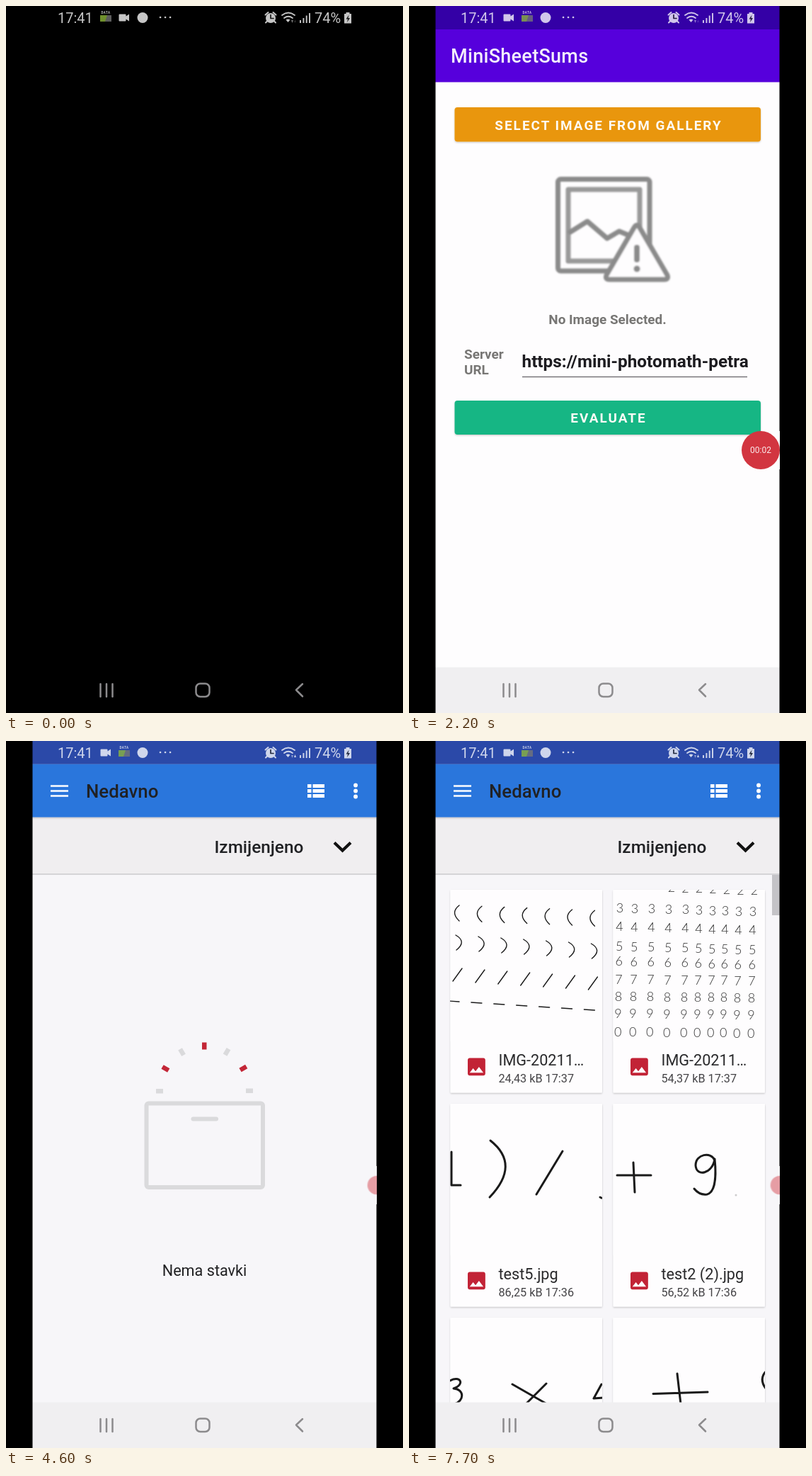
An HTML page that plays this animation: 561x998 px, repeating every 8000 ms.

```html
<!DOCTYPE html>
<html lang="hr">
<head>
<meta charset="utf-8">
<title>Screen recording</title>
<style>
html, body { margin: 0; width: 100%; height: 100%; overflow: hidden; background: #000; }
svg { display: block; width: 100vw; height: 100vh; font-family: Roboto, sans-serif; }
.bold { font-weight: 700; }
.medium { font-weight: 500; }
.mid { text-anchor: middle; }
.line { fill: none; stroke-linecap: round; stroke-linejoin: round; }

.anim { animation: 8s step-end -20ms infinite; }
#app { animation-name: launch; transform-origin: 280.5px 499px; }
#dim { animation-name: dim; }
#picker { animation-name: open; }
#bars { animation-name: bars; }
#empty { animation-name: empty; }
#cards { animation-name: cards; }
#scrollbar, .thumb { opacity: 0; animation-name: thumbs; }
#bubble { animation-name: bubble; transform-origin: 497px 627px; }
#time0 { animation-name: time0; }
#time1 { animation-name: time1; }
#time2 { animation-name: time2; }
#time3 { animation-name: time3; }
#data { animation-name: data; }
#camera { animation-name: camera; }
#upload { animation-name: upload; }

@keyframes launch {
  0% { opacity: 0; }
  1.25% { opacity: .5; transform: translate(-60px, 27px) scale(.62); }
  2.5% { opacity: .95; transform: translate(-18px, 8px) scale(.892); }
  3.75% { opacity: 1; transform: translate(-4px, 2px) scale(.975); }
  5%, 100% { opacity: 1; transform: none; }
}
@keyframes dim {
  0% { opacity: 0; }
  31.25% { opacity: .25; }
  32.5% { opacity: .46; }
  33.75%, 100% { opacity: .5; }
}
@keyframes open {
  0% { opacity: 0; transform: translateY(80px); }
  31.25% { opacity: .4; transform: translateY(75px); }
  32.5% { opacity: .85; transform: translateY(43px); }
  33.75% { opacity: 1; transform: translateY(10px); }
  35%, 100% { opacity: 1; transform: none; }
}
@keyframes bars { 0% { opacity: 0; } 35%, 100% { opacity: 1; } }
@keyframes empty { 0% { opacity: 0; } 43.75% { opacity: 1; } 62.5%, 100% { opacity: 0; } }
@keyframes cards {
  0% { opacity: 0; }
  62.5% { opacity: .4; }
  63.75% { opacity: .8; }
  65%, 100% { opacity: 1; }
}
@keyframes thumbs {
  0% { opacity: 0; }
  85% { opacity: .4; }
  86.25% { opacity: .8; }
  87.5%, 100% { opacity: 1; }
}
@keyframes bubble {
  0% { opacity: 0; }
  1.25% { opacity: 1; transform: none; }
  38.75% { opacity: .85; transform: translateX(10px) scale(.8); }
  40% { opacity: .65; transform: translateX(20px) scale(.6); }
  41.25%, 100% { opacity: .46; transform: translateX(27px) scale(.49); }
}
@keyframes time0 { 0% { opacity: 1; } 12.5%, 100% { opacity: 0; } }
@keyframes time1 { 0% { opacity: 0; } 12.5% { opacity: 1; } 25%, 100% { opacity: 0; } }
@keyframes time2 { 0% { opacity: 0; } 25% { opacity: 1; } 37.5%, 100% { opacity: 0; } }
@keyframes time3 { 0% { opacity: 0; } 37.5% { opacity: 1; } 38.75%, 100% { opacity: 0; } }
@keyframes data {
  0% { transform: none; }
  1.25% { transform: translateX(12px); }
  2.5% { transform: translateX(22px); }
  3.75%, 100% { transform: translateX(26px); }
}
@keyframes camera {
  0% { transform: translateX(26px); }
  1.25% { transform: translateX(14px); }
  2.5% { transform: translateX(4px); }
  3.75%, 100% { transform: none; }
}
@keyframes upload { 0% { opacity: .2; } 56.25%, 100% { opacity: 1; } }
</style>
</head>
<body>
<svg viewBox="0 0 561 998">
  <defs>
    <filter id="soft" x="-10%" y="-10%" width="120%" height="125%">
      <feDropShadow dx="0" dy="1.2" stdDeviation="1.1" flood-opacity=".22"/>
    </filter>
    <filter id="blur"><feGaussianBlur stdDeviation=".8"/></filter>
    <clipPath id="field"><rect x="158" y="480" width="322" height="42"/></clipPath>
    <path id="picture" d="M18 16V2c0-1.1-.9-2-2-2H2C.9 0 0 .9 0 2v14c0 1.1.9 2 2 2h14c1.1 0 2-.9 2-2zM5.5 10.5l2.5 3 3.5-4.5 4.5 6H2z" fill="#c22336"/>
  </defs>

  <g id="app" class="anim">
    <rect x="37" width="487" height="998" fill="#fefdfe"/>
    <rect x="37" y="33" width="487" height="74.5" fill="#5600dc"/>
    <rect x="37" width="487" height="33" fill="#3400a6"/>
    <text x="59" y="80" class="medium" font-size="27" letter-spacing=".3" fill="#f4effc">MiniSheetSums</text>

    <g filter="url(#soft)">
      <rect x="64.5" y="143" width="432.5" height="48.5" rx="4" fill="#e9960c"/>
      <rect x="64.5" y="557" width="432.5" height="48" rx="4" fill="#18b684"/>
    </g>
    <g class="bold mid" font-size="18.94" letter-spacing="2" fill="#fdfbf6">
      <text x="282" y="174.5">SELECT IMAGE FROM GALLERY</text>
      <text x="282" y="588">EVALUATE</text>
    </g>

    <g class="line" stroke="#8b8b8b" stroke-width="7" filter="url(#blur)">
      <rect x="210.5" y="244.5" width="129.500" height="129.500" rx="4"/>
      <rect x="225" y="259" width="101" height="101" stroke="#999"/>
      <path d="M228 319l24-15 28 24 17-10 12 5"/>
      <path d="M318 313q4-7 8 0l39 67q2 6-4 6h-78q-6 0-4-6z" fill="#fefdfe"/>
      <path d="M322 341v17" stroke-width="8"/>
      <path d="M322 371h.1" stroke-width="9"/>
    </g>

    <g class="bold" font-size="18.94" fill="#777674">
      <text x="280.5" y="449" class="mid">No Image Selected.</text>
      <text x="78" y="497.5">Server</text>
      <text x="78" y="520">URL</text>
    </g>
    <text x="159.5" y="510" class="bold" font-size="24.35" fill="#1c1b1f" clip-path="url(#field)">https://mini-photomath-petra</text>
    <path d="M160 523.5H478" stroke="#77757a" stroke-width="1.4"/>
    <rect x="37" y="933.5" width="487" height="65" fill="#f0eff1"/>
  </g>

  <rect id="dim" class="anim" x="37" width="487" height="998"/>

  <g id="picker" class="anim">
    <rect x="37" width="487" height="998" fill="#f7f6f9"/>
    <rect x="37" width="487" height="32.5" fill="#2b49a8"/>
    <g id="empty" class="anim">
      <g class="line" stroke="#dadadc" stroke-width="6">
        <rect x="198.5" y="511.5" width="164.5" height="118.5" rx="3"/>
        <path d="M264.5 533.5H297"/>
      </g>
      <g id="rays"></g>
      <text x="280.5" y="755" class="mid" font-size="21.65" fill="#202022">Nema stavki</text>
    </g>
    <g id="cards" class="anim"></g>
    <rect id="scrollbar" class="anim" x="513" y="189" width="11" height="57" fill="#c4c3c7"/>
    <g id="bars" class="anim">
      <rect x="37" y="107" width="487" height="81" fill="#f0eef0"/>
      <path d="M37 188H524" stroke="#cbcacd" stroke-width="1.4"/>
      <rect x="37" y="32.5" width="487" height="75" fill="#2976dc" filter="url(#soft)"/>
      <rect x="37" y="30" width="487" height="2.5" fill="#2b49a8"/>
      <path d="M63 63.500h25m-25 7h25m-25 7h25" stroke="#fff" stroke-width="2.7"/>
      <path d="M426 63.500h5.500m2 0h16.500m-24 7h5.500m2 0h16.500m-24 7h5.500m2 0h16.500" stroke="#fff" stroke-width="5.2"/>
      <path d="M494 62.500h.1m-.1 8h.1m-.1 8h.1" class="line" stroke="#fff" stroke-width="5.8"/>
      <g class="medium" fill="#202124">
        <text x="113" y="80" font-size="25.8">Nedavno</text>
        <text x="294.5" y="158" font-size="24.35">Izmijenjeno</text>
      </g>
      <path d="M464 143.500l11.500 11 11.500-11" fill="none" stroke="#111" stroke-width="4.2"/>
    </g>
    <rect x="37" y="933.5" width="487" height="65" fill="#f0eff1"/>
  </g>

  <g class="line" stroke="#8c8b8d" stroke-width="2.5">
    <path d="M133.500 957v18m8.500-18v18m8.500-18v18M419 957l-9 8.500 9 9"/>
    <rect x="268.5" y="956.5" width="19" height="18.5" rx="6"/>
  </g>

  <g fill="#fff" opacity=".78">
    <text x="73" y="23.5" font-size="20">17:41</text>
    <g id="data" class="anim">
      <text x="141" y="11" class="mid bold" font-size="4.5" letter-spacing=".4">DATA</text>
      <rect x="133" y="13" width="16" height="9" fill="#777"/>
      <path d="M133 13h10l-3 9h-7z" fill="#8fb83a"/>
    </g>
    <path id="camera" class="anim" d="M134.500 11.500h8q1 0 1 1v2l4.500-3v10l-4.500-3v2q0 1-1 1h-8q-1 0-1-1v-8q0-1 1-1z"/>
    <circle cx="193" cy="16.5" r="7.5"/>
    <path d="M218 16h.1m6.900 0h.1m6.900 0h.1" class="line" stroke="#fff" stroke-width="2.6"/>

    <circle cx="374" cy="17" r="7"/>
    <path d="M366.500 12.500l4-3.500m7 0l4 3.500m-12.500 9l-2 2m12-2l2 2" class="line" stroke="#fff" stroke-width="2"/>
    <path d="M374 12.500v5h4" class="line" stroke="#222" stroke-width="1.7"/>
    <path d="M390 13q9-7 18 0m-15 4q6-4.500 12 0" class="line" stroke="#fff" stroke-width="1.8"/>
    <path d="M395.500 19.500q3-2 6 0l-3 3.500z"/>
    <path d="M403 20h3l-1.500 4z" opacity=".6"/>
    <path id="upload" class="anim" d="M407 23h3l-1.500-4z"/>
    <path d="M416 24v-4m4.400 4v-7m4.300 7v-10.500m4.300 10.500V10" stroke="#fff" stroke-width="1.9"/>
    <text x="436" y="23.5" font-size="20">74%</text>
    <path d="M480.500 9h5v2h2.500v13.500h-10V11h2.500z"/>
    <path d="M484.500 12.500l-4 6h2.500l-1 4.500 4-6h-2.500z" fill="#222"/>
  </g>

  <g id="bubble" class="anim">
    <circle cx="497" cy="627" r="27" fill="#d23540"/>
    <g class="mid" font-size="12" fill="#fbe9ea">
      <text id="time0" class="anim" x="497" y="631">00:00</text>
      <text id="time1" class="anim" x="497" y="631">00:01</text>
      <text id="time2" class="anim" x="497" y="631">00:02</text>
      <text id="time3" class="anim" x="497" y="631">00:03</text>
    </g>
  </g>
  <path d="M0 0H37.500V998H0zM523.500 0H561V600H523.500zM523.500 654H561V998H523.500zM524 600H561V654H524z"/>
</svg>

<script>
const byId = id => document.getElementById(id);
const range = (n, fn) => Array.from({ length: n }, (_, i) => fn(i)).join('');
const stroke = (d, width = 3) =>
  `<path class="line" d="${d}" stroke="#1a1a1a" stroke-width="${width}"/>`;

byId('rays').innerHTML = range(7, i =>
  `<rect x="212" y="491" width="10" height="6.5" fill="${i % 2 ? '#c32637' : '#dadadc'}" transform="rotate(${i * 30} 280.5 494)"/>`);

// Rows of handwritten brackets, slashes and dashes that sink to the right.
function brackets() {
  const marks = [
    [71, 232, 1.2, 'q-13 10 0 22'],
    [66, 274, 2, 'q16 9 1 21'],
    [62, 339, 2, 'l13-18'],
    [56, 367, 2, 'l15 1'],
  ];
  return marks.map(([x, y, sink, d]) =>
    stroke(range(7, i => `M${x + i * 31.9} ${y + i * sink}${d}`), 1.4)).join('');
}

function digits() {
  const columns = [0, 21, 45, 69, 93, 112, 131, 149, 168, 188];
  const rows = [['3', 242], ['4', 268], ['5', 296], ['6', 317], ['7', 343], ['8', 367], ['9', 391], ['0', 417]];
  const glyph = (text, x, y) => `<text x="${x}" y="${y}">${text}</text>`;
  return `<g class="mid" font-family="Lato, sans-serif" font-weight="300" font-size="18" fill="#333">
    ${range(7, i => glyph('2', 371 + i * 19.5, 213 + i * .7))}
    ${rows.map(([n, y], r) => range(10, i =>
      glyph(n, 298 - r * .4 + columns[i], y + i * (r < 4 ? .6 : .2)))).join('')}</g>`;
}

const cards = [
  ['IMG-20211…', '24,43 kB 17:37', brackets()],
  ['IMG-20211…', '54,37 kB 17:37', digits()],
  ['test5.jpg', '86,25 kB 17:36',
    stroke('M60 580V627H73M115 564Q158 598 114 644M217 579L180 640M270 644l2 1')],
  ['test2 (2).jpg', '56,52 kB 17:36',
    stroke('M294 613L342 613M317 595L319 637M432 592C427 579 405 583 405 599C406 616 429 611 432 590C434 610 434 637 421 640C412 641 407 637 403 632') +
    '<circle cx="462" cy="641" r="1.5" fill="#ccc"/>'],
  ['', '', stroke('M58 903C72 895 80 908 63 914C79 915 78 932 64 936M146 908L195 936M194 907L164 937M272 908L261 928L275 927')],
  ['', '', stroke('M345 921.5L422 919M379 893L384 936M505 889Q494 900 504 914')],
];

byId('cards').innerHTML = cards.map(([name, info, drawing], i) => {
  const x = 58.5 + (i % 2) * 230;
  const row = i >> 1;
  const y = 210 + row * 302;
  return `<clipPath id="area${i}"><rect x="${x}" y="${y}" width="214.5" height="214"/></clipPath>
    <rect x="${x}" y="${y}" width="214.5" height="286.5" rx="1.5" fill="#fefdfe" filter="url(#soft)"/>
    <use href="#picture" transform="translate(${x + 87} ${y + 86.5}) scale(2.28)"/>
    <use href="#picture" transform="translate(${x + 24.5} ${y + 237.5}) scale(1.38)"/>
    <text x="${x + 68}" y="${y + 247.5}" font-size="21.65" fill="#29292b">${name}</text>
    <text x="${x + 68}" y="${y + 271.5}" font-size="16.24" fill="#444346">${info}</text>
    <g class="thumb anim" clip-path="url(#area${i})" style="animation-delay:${row * 100 - 20}ms">
      <rect x="${x}" y="${y}" width="214.5" height="214" fill="#fefdfe"/>${drawing}
    </g>`;
}).join('');
</script>
</body>
</html>
```
